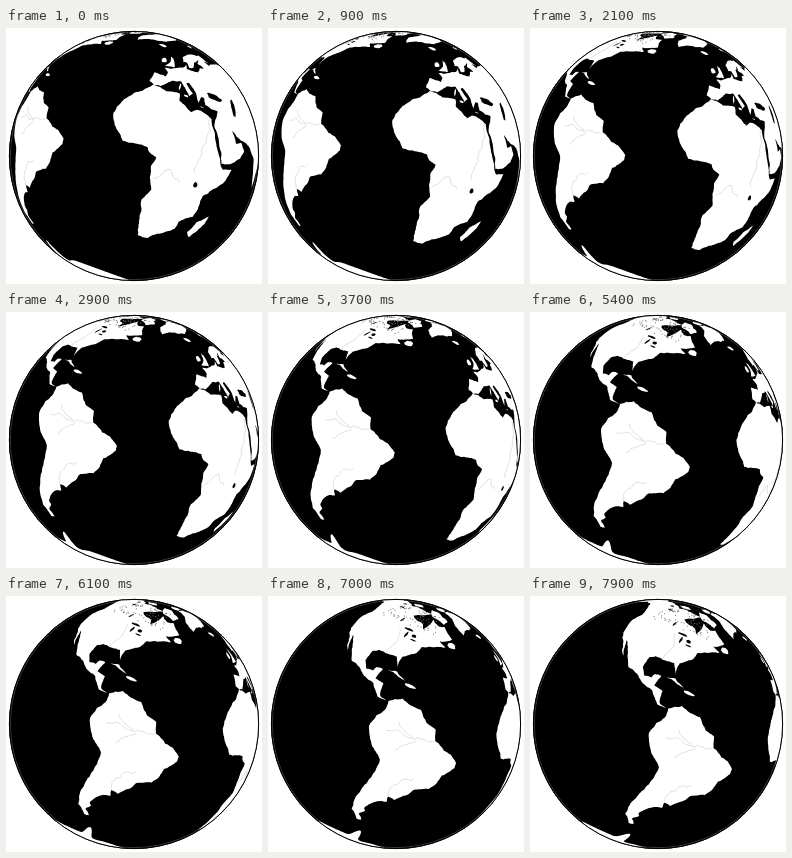
An HTML page with a canvas that plays this animation: 256 px wide and 256 px high, repeating every 8000 ms.

```html
<!DOCTYPE html>
<html lang="en">
<head>
<meta charset="utf-8">
<title>Turning globe</title>
<style>
html, body { margin: 0; width: 100%; height: 100%; overflow: hidden; background: #fff; }
canvas { display: block; }
</style>
</head>
<body>
<canvas id="globe" width="256" height="256"></canvas>
<script>
const ctx = document.getElementById('globe').getContext('2d');
const RAD = Math.PI / 180, CENTER = 128, R = 124.6;
const TILT = 23.4 * RAD, SIN = Math.sin(TILT), COS = Math.cos(TILT);
const STEP = 100, STEPS = 80;

let seed = 7;
const random = () => (seed = seed * 16807 % 2147483647) / 2147483647;

// A place on the unit sphere: longitude, height and distance from the axis.
const place = (lon, lat) => [lon * RAD, Math.sin(lat * RAD), Math.cos(lat * RAD)];

// Adds the points from a to b, bent a little at every halving.
function wander(out, a, b, rough) {
  const dx = b[0] - a[0], dy = b[1] - a[1];
  if (Math.hypot(dx, dy) < 1.3) return out.push(place(...a));
  const bend = (random() - .5) * rough;
  const mid = [a[0] + dx / 2 - dy * bend, a[1] + dy / 2 + dx * bend];
  wander(out, a, mid, rough);
  wander(out, mid, b, rough);
}

// Points are longitude, latitude pairs in degrees.
function trace(list, closed, rough) {
  const out = [], n = list.length;
  for (let i = 0; i < n - (closed ? 0 : 2); i += 2) {
    const j = (i + 2) % n;
    wander(out, [list[i], list[i + 1]], [list[j], list[j + 1]], rough);
  }
  return out;
}
const coast = (...list) => trace(list, true, .16);
const river = (...list) => trace(list, false, .35);

function oval(lon, lat, rx, ry) {
  return Array.from({ length: 16 }, (_, i) => {
    const a = i * Math.PI / 8, r = .85 + random() * .3;
    return place(lon + rx * r * Math.cos(a), lat + ry * r * Math.sin(a));
  });
}

const bump = (lon, at, width) => Math.exp(-(((lon - at) / width) ** 2));
const antarctica = Array.from({ length: 241 }, (_, i) => {
  const lon = i * 1.5 - 180;
  return place(lon, -71.5 + 3.5 * Math.cos((lon - 100) * RAD) + 11 * bump(lon, -60, 6)
    - 3 * bump(lon, -40, 12) - 6 * bump(lon, -170, 20));
});

const africa = coast(-6,36, 10,37.3, 11,33.5, 19,30.3, 22,32.8, 32,31.3, 33,28, 37,21, 43,12, 45,10.5,
  51.2,12, 48,4.5, 39.5,-4.5, 40.5,-15, 35,-20, 35.5,-24, 32.5,-27, 26,-34, 20,-34.8, 18,-32, 14.4,-22.5,
  11.8,-17, 13.8,-11, 9,-1, 9.7,3.5, 6,4.3, 4,6.3, -7.6,4.4, -13.3,9, -17.4,14.7, -16.5,21, -13,27.8,
  -9.7,30.5);
const eurasia = coast(-5.6,36, -2,36.8, 0,39, 3,42.5, 9,44.4, 12.3,41.7, 16,38, 18,40.2, 12.5,44.5, 14,45.5,
  19.4,41.8, 22.5,36.6, 24,40.5, 26,40.5, 27,37, 36,36.5, 34.5,31.3, 34.5,28, 39,21.5, 43.3,12.8, 52,15.8,
  59.8,22.4, 56.3,26, 51.5,24.5, 48,30, 56.5,27, 66.8,25, 72.7,21, 77.5,8, 80.3,15.5, 88,21.7, 95,16,
  95,72, 68,69, 44,67, 38,64.5, 33,66.5, 41,67, 28,71, 15,68.4, 5.2,62, 7,58, 10.5,59, 13,55.5, 17,57.5,
  17.5,61.5, 24,65.8, 21.4,62, 28,60, 23.5,59, 21,55, 11,54, 10,57.5, 8,54, 2,51, -4.7,48.4, -1.2,46,
  -1.6,43.4, -9,43, -9,37);
const southAmerica = coast(-77.5,8.3, -72,12, -62,10.6, -57,6, -52,5, -50,0, -44,-2.6, -40,-2.9, -35.2,-5.5,
  -34.8,-8, -39,-13.5, -39.5,-19, -41,-22, -48,-25.5, -48.7,-28, -54,-34.5, -58,-34, -57,-37, -62,-39,
  -65,-42, -67.3,-46, -65.8,-47.5, -69,-51, -65.2,-54.7, -69,-55.3, -75,-50, -73.6,-38, -70.3,-25,
  -70.3,-18.3, -76,-14, -81.2,-5.5, -80,0, -77.3,4);
const northAmerica = coast(-77.3,8.3, -82,9, -83.3,15, -88,15.8, -87,21.4, -90.3,21, -91,18.7, -94.5,18.2,
  -97.5,22, -97.2,27.6, -94.5,29.5, -84,30, -82.7,28, -80.8,25.2, -81.3,31, -75.8,35.5, -74,40.5, -70,42.5,
  -66,44, -60,46, -65,48.5, -58,51.5, -56,53, -64.5,60.3, -69,58.8, -77,62.4, -77,57, -79.5,51.5,
  -82.3,55.2, -94.5,58.8, -82,67.5, -96,68, -128,70.2, -156,71.3, -168,65.5, -158,58.5, -163,55,
  -148,60.2, -134,57, -124,49, -124.5,43, -120.6,34.5, -115,29, -110,23, -114.7,31.5, -105.5,21, -104,19,
  -95.5,15.8, -87.5,13, -83,8.2, -78.5,8.2);

const land = [
  africa, eurasia, southAmerica, northAmerica, antarctica,
  coast(-44,60, -53,66, -55,72, -70,77, -60,82, -32,83.5, -19,80, -23,70.5, -40,65), // Greenland
  coast(49.5,-12, 50,-16, 47,-25, 43.5,-23, 44.5,-17), // Madagascar
  coast(-5.5,50, 1.5,51.5, -2,57.6, -5,58.5, -3,54), // Britain
  coast(-66,62, -78,64.5, -89,72.5, -77,72.7, -62,66.5), // Baffin
  coast(-85,22, -80,23, -74.2,20.2, -78,20.8), // Cuba
  oval(-8,53.4, 2,1.8), oval(-19,65, 4.5,1.2), oval(-71,18.9, 2.7,.8), oval(-56,48.8, 3,1.8),
  oval(14,37.5, 1.4,.6), oval(9,41, .5,2), oval(25,35.2, 1.2,.2), oval(-110,71, 8,2),
  oval(-80,79.5, 11,3), oval(18,78.5, 6,1.2)
];
const lakes = [
  oval(34,43.4, 6,1.6), oval(51,42, 2,4.7), oval(33,-1, 1.1,1.2), oval(-88,47.6, 3.5,.7),
  oval(-86.9,43.8, .7,2), oval(-82,44.8, 1.6,1), oval(-81,42.2, 2,.4), oval(-97.7,52.2, .7,1.7),
  oval(-114,61.8, 3,.6), oval(-121,66, 2.5,.8)
];
const rivers = [
  river(-50.5,-.5, -60,-3.2, -74,-4.5), river(-58.5,-3.3, -65.5,-12), river(-60,-3.1, -70,2),
  river(-58.3,-34, -58.5,-27.3, -50,-20), river(31,31, 31,19, 31,3), river(12.4,-6, 18,1, 26,-3),
  river(-90,29.5, -89,37, -94,46)
];
const ponds = Array.from({ length: 70 }, () => place(-118 + random() * 48, 50 + random() * 18));

// Hidden points slide out to the rim.
function project([lon, north, ring], turn) {
  let east = ring * Math.sin(lon + turn);
  const front = Math.cos(lon + turn) > 0;
  if (!front) {
    const r = Math.hypot(east, north);
    east /= r;
    north /= r;
  }
  return [CENTER + R * (east * COS + north * SIN), CENTER + R * (east * SIN - north * COS), front];
}

function path(points) {
  ctx.beginPath();
  points.forEach(([x, y]) => ctx.lineTo(x, y));
}

function fillShape(shape, turn, color) {
  const points = shape.map(p => project(p, turn));
  if (!points.some(p => p[2])) return;
  path(points);
  ctx.fillStyle = color;
  ctx.fill();
}

function ring(r, color, width) {
  ctx.beginPath();
  ctx.arc(CENTER, CENTER, r, 0, 2 * Math.PI);
  ctx.strokeStyle = color;
  ctx.lineWidth = width;
  ctx.stroke();
}

function draw(now) {
  const turn = Math.floor(now / STEP) % STEPS * RAD;
  ctx.fillStyle = '#fff';
  ctx.fillRect(0, 0, 256, 256);
  ring(124.6, '#000', 1);
  ctx.fillStyle = '#000';
  ctx.fill();

  land.forEach(s => fillShape(s, turn, '#fff'));
  lakes.forEach(s => fillShape(s, turn, '#000'));
  ctx.strokeStyle = '#ccc';
  ctx.lineWidth = .6;
  for (const line of rivers) {
    path(line.map(p => project(p, turn)).filter(p => p[2]));
    ctx.stroke();
  }
  ctx.fillStyle = '#777';
  for (const pond of ponds) {
    const [x, y, front] = project(pond, turn);
    if (front) ctx.fillRect(x, y, 1, 1);
  }

  ring(123.7, 'rgba(255,255,255,.4)', .6);
  ring(124.6, '#000', 1);
}

const start = performance.now();
function tick() {
  draw(performance.now() - start);
  requestAnimationFrame(tick);
}
tick();
</script>
</body>
</html>
```
